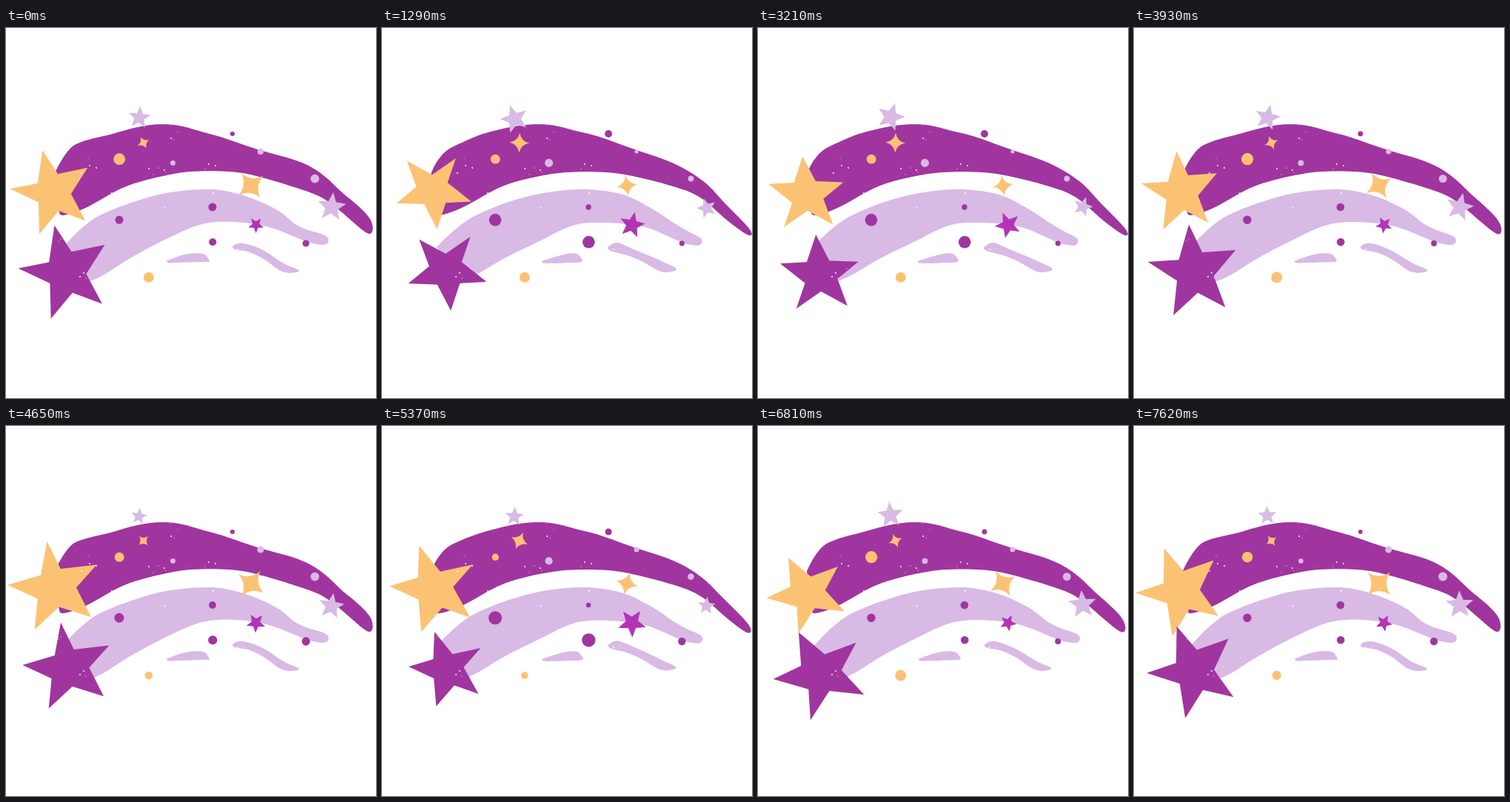
Write an HTML page without scripts that moves like this. It is 500x500 px and loops after 7680 ms.

```html
<!DOCTYPE html>
<html lang="en">
<head>
<meta charset="utf-8">
<title>Shooting stars</title>
<style>
html, body { margin: 0; width: 100%; height: 100%; overflow: hidden; background: #fff; }
svg { display: block; width: 100%; height: 100%; }

.purple { fill: #a0359f; }
.lilac { fill: #d8bae5; }
.orange { fill: #fcc274; }
.pink { fill: #b334b6; }
.specks { fill: none; stroke: #fff; stroke-linecap: round; }

/* --r mean radius, --a swing, --p step of the largest size, --t start angle */
.pulse, .spin {
  transform-origin: 0 0;
  animation: pulse 960ms step-end infinite;
  animation-delay: calc(var(--p) * 80ms - 961ms);
}
.spin {
  animation: pulse 960ms step-end infinite, spin 3840ms steps(48) infinite;
  animation-delay: calc(var(--p) * 80ms - 961ms), -1ms;
}
@keyframes pulse {
  0%, 100% { scale: calc(var(--r) + var(--a)); }
  8.33%, 91.66% { scale: calc(var(--r) + var(--a) * .866); }
  16.66%, 83.33% { scale: calc(var(--r) + var(--a) * .5); }
  25%, 75% { scale: var(--r); }
  33.33%, 66.66% { scale: calc(var(--r) - var(--a) * .5); }
  41.66%, 58.33% { scale: calc(var(--r) - var(--a) * .866); }
  50% { scale: calc(var(--r) - var(--a)); }
}
@keyframes spin {
  from { rotate: var(--t); }
  to { rotate: calc(var(--t) + 360deg); }
}

.sway { animation: 960ms ease-in-out -80ms infinite; }
#upper { animation-name: upper; }
#lower { animation-name: lower; }
#dash { animation-name: dash; }
#tail { animation-name: tail; }
@keyframes upper {
  0%, 100% { d: path("M66 196S80 164 94 157S128 148 145 143S186 130 212 130S254 138 275 143S325 160 350 167S398 178 418 191S446 216 460 227S491 252 494 262S495 279 490 278S470 263 455 250S428 228 410 222S350 202 325 197S268 193 250 194S190 204 165 213S119 240 96 248S74 253 72 250Z"); }
  50% { d: path("M66 198S74 170 97 160S128 145 147 140S186 130 212 130S254 138 275 142S325 159 350 167S398 183 418 196S442 213 456 229S488 261 496 271S498 282 493 279S470 264 455 250S430 227 412 220S355 203 328 198S268 194 250 195S190 203 165 213S119 240 96 248S74 253 72 250Z"); }
}
@keyframes lower {
  0%, 100% { d: path("M76 298S104 264 127 253S172 235 195 228S252 218 275 218S325 227 342 234S372 248 382 258S404 272 415 275S438 281 436 288S426 293 415 291S380 277 362 271S312 260 285 262S240 274 223 282S172 308 155 319S125 340 108 343Z"); }
  50% { d: path("M74 296S102 265 127 253S172 234 195 228S252 217 275 218S325 222 343 232S375 250 385 257S408 272 418 277S434 284 432 290S422 294 412 292S382 278 362 271S312 263 285 263S240 274 223 283S173 306 155 317S122 338 105 343Z"); }
}
@keyframes dash {
  0%, 100% { d: path("M217 315S232 308 242 306S268 302 272 309S278 316 268 316S240 317 232 317S218 319 217 315Z"); }
  50% { d: path("M216 315S234 309 242 307S262 302 266 307S275 317 264 317S240 318 232 318S215 319 216 315Z"); }
}
@keyframes tail {
  0%, 100% { d: path("M306 296S310 290 320 291S346 298 357 306S376 320 388 324S398 330 386 331S366 326 358 319S340 307 330 303S308 302 306 296Z"); }
  50% { d: path("M305 297S313 287 322 291S346 302 357 306S380 316 391 321S399 328 388 330S367 324 358 319S340 310 330 307S305 302 305 297Z"); }
}
</style>
</head>
<body>
<svg viewBox="0 0 500 500">
  <defs>
    <path id="star" d="M0-1L.26-.356L.951-.309L.418.136L.588.809L0 .44L-.588.809L-.418.136L-.951-.309L-.26-.356Z"/>
    <path id="big" transform="translate(-.062 -.029)" d="M.017-1L.22-.381L.924-.34L.395.144L.553.833L.016.45L-.556.855L-.385.14L-.943-.334L-.29-.29Z"/>
    <path id="spark" d="M0-1Q.17-.17 1 0Q.17.17 0 1Q-.17.17-1 0Q-.17-.17 0-1Z"/>
  </defs>

  <path id="upper" class="sway purple"/>
  <g class="lilac">
    <path id="lower" class="sway"/>
    <path id="dash" class="sway"/>
    <path id="tail" class="sway"/>
  </g>

  <use href="#big" class="spin orange" style="translate:67.4px 222.6px;--r:58.3;--a:6.1;--p:9;--t:-15deg"/>
  <use href="#big" class="spin purple" style="translate:85.6px 330.6px;--r:58.6;--a:6.4;--p:0;--t:-15deg"/>

  <g class="specks">
    <path stroke-width="1.9" d="M113 186h0M122 189h0M102 196h0M193 190h0M214 192h0M223 149h0M274 184h0M283 186h0M143 223h0M215 243h0M280 223h0M313 299h0M105 331h0M100 336h0"/>
    <path stroke-width="1.2" d="M111 176h0M199 198h0M206 189h0M216 195h0M227 151h0M232 140h0M222 131h0M269 190h0M221 236h0M228 235h0M291 229h0M302 227h0M354 239h0M132 267h0M321 298h0M71 288h0M74 285h0M108 338h0M120 325h0"/>
  </g>

  <g class="purple">
    <circle r="1" class="pulse" style="translate:306px 143px;--r:4;--a:1.1;--p:5"/>
    <circle r="1" class="pulse" style="translate:153px 259.3px;--r:7.4;--a:1.9;--p:6"/>
    <circle r="1" class="pulse" style="translate:279px 242px;--r:4.3;--a:1.2;--p:0"/>
    <circle r="1" class="pulse" style="translate:279.3px 289.3px;--r:7.2;--a:2.2;--p:6"/>
    <circle r="1" class="pulse" style="translate:405.3px 291px;--r:4.6;--a:1.2;--p:9"/>
  </g>
  <g class="lilac">
    <circle r="1" class="pulse" style="translate:225.5px 182.4px;--r:4.5;--a:1.2;--p:5"/>
    <circle r="1" class="pulse" style="translate:344px 167px;--r:3.6;--a:1;--p:10"/>
    <circle r="1" class="pulse" style="translate:417.4px 203.6px;--r:4.9;--a:1.1;--p:11"/>
    <use href="#star" x=".06" y="-.035" class="spin" style="translate:179.2px 121.5px;--r:15.5;--a:4.7;--p:3;--t:5.5deg"/>
    <use href="#star" x=".06" y="-.035" class="spin" style="translate:438.9px 242.4px;--r:15.9;--a:4.1;--p:0;--t:6deg"/>
  </g>
  <g class="orange">
    <circle r="1" class="pulse" style="translate:153.2px 177.2px;--r:6.4;--a:1.7;--p:1"/>
    <circle r="1" class="pulse" style="translate:192.8px 337px;--r:6.15;--a:1.6;--p:2"/>
    <use href="#spark" class="spin" style="translate:185.7px 155px;--r:11;--a:2.7;--p:5;--t:-28deg"/>
    <use href="#spark" class="spin" style="translate:331px 213px;--r:17.5;--a:4.2;--p:11;--t:-38deg"/>
  </g>
  <use href="#star" class="spin pink" style="translate:337.8px 266.2px;--r:15.6;--a:4.6;--p:6;--t:36deg"/>
</svg>
</body>
</html>
```
